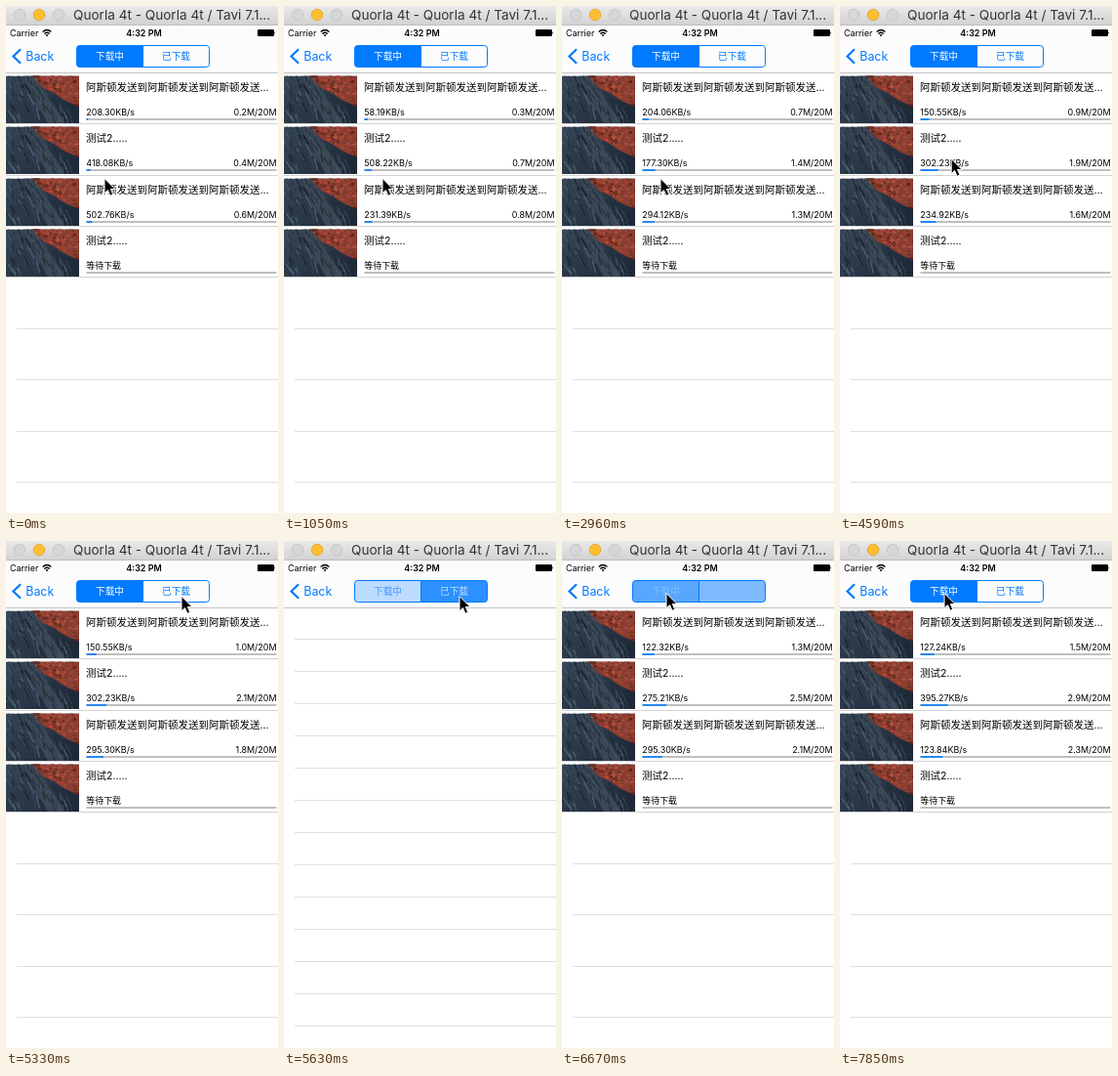
These frames come from a looping animation (279x519 px, 8 s). An HTML page:

```html
<!DOCTYPE html>
<html lang="zh-CN">
<head>
<meta charset="utf-8">
<style>
html, body { margin: 0; width: 100%; height: 100%; overflow: hidden; background: #fff; }
svg { display: block; width: 279px; height: 519px; }
text { font-family: Inter, "Noto Sans CJK SC", "Noto Sans CJK", sans-serif; white-space: pre; }
.small { font-size: 8.95px; }
.name { font-size: 10.5px; }
.tab { font-size: 9.7px; text-anchor: middle; }
</style>
</head>
<body>
<svg viewBox="0 0 279 519">
  <defs>
    <linearGradient id="chrome" x2="0" y2="1">
      <stop offset="0" stop-color="#e9e9e9"/><stop offset="1" stop-color="#d2d2d2"/>
    </linearGradient>
    <linearGradient id="slate" x2="1" y2=".6">
      <stop offset="0" stop-color="#35475a"/><stop offset="1" stop-color="#1f2a38"/>
    </linearGradient>
    <clipPath id="photoBox"><rect width="75" height="48.5"/></clipPath>
    <clipPath id="pill"><rect x="72.5" y="40.5" width="136" height="22" rx="3"/></clipPath>
    <g id="photo" clip-path="url(#photoBox)">
      <path d="M0 0H75V49H0Z" fill="url(#slate)"/>
      <path d="M27 0H75V31Q62 27 54 21T36 12Z" fill="#8c3d31"/>
      <g id="leaves"></g>
      <path d="M18 0H27L62 49H43Z" fill="#3b4855"/>
      <g id="bark" stroke-linecap="round"></g>
    </g>
  </defs>

  <rect width="279" height="519" fill="#fff"/>
  <g id="list"></g>
  <g id="blank"></g>

  <rect y="19" width="279" height="49" fill="#fcfcfc"/>
  <rect y="68" width="279" height="1" fill="#c4c4c6"/>
  <rect width="279" height="19.5" fill="url(#chrome)"/>
  <rect y="19" width="279" height=".8" fill="#b4b4b4"/>
  <g stroke-width=".8" stroke="#c2c2c2" fill="#d6d6d6">
    <circle cx="14" cy="9" r="5.8"/>
    <circle cx="34" cy="9" r="5.8" fill="#fdbe30" stroke="#e0a42a"/>
    <circle cx="54" cy="9" r="5.8"/>
  </g>
  <text x="69" y="14" font-size="13.6" fill="#333">Quorla 4t - Quorla 4t / Tavi 7.1...</text>

  <text class="small" x="4" y="31">Carrier</text>
  <g fill="none" stroke="#000" stroke-width="1.3">
    <path d="M37.6 26.6Q42 22.5 46.4 26.6M39.3 28.5Q42 26 44.7 28.5"/>
    <path d="M42 31.3l-1.4-1.6q1.4-1.2 2.8 0z" fill="#000" stroke="none"/>
  </g>
  <text class="small" x="141.5" y="31" text-anchor="middle" font-weight="600">4:32 PM</text>
  <rect x="258" y="24" width="17" height="7" rx="1.2"/>
  <path d="M275.4 26.2q1.6 1.3 0 2.6z"/>

  <path d="M15 44.3L7.5 51.5 15 58.7" fill="none" stroke="#007aff" stroke-width="2.2"/>
  <text x="20.3" y="56" font-size="12.4" fill="#007aff">Back</text>
  <g clip-path="url(#pill)" fill="#007aff">
    <rect id="leftFill" x="72" y="40" width="68.5" height="23"/>
    <rect id="rightFill" x="140.5" y="40" width="69" height="23"/>
  </g>
  <path d="M140.5 41V62" stroke="#007aff"/>
  <rect x="72.5" y="40.5" width="136" height="22" rx="3" fill="none" stroke="#007aff"/>
  <text id="leftTab" class="tab" x="106.5" y="55">下载中</text>
  <text id="rightTab" class="tab" x="174.5" y="55">已下载</text>

  <path id="cursor" d="M0 0V15.2L3.5 12 6 17.8 8.8 16.6 6.3 11H11Z" stroke="#fff" stroke-width="1" stroke-linejoin="round"/>
</svg>
<script>
const LOOP = 8000, TICKS = 54, ROW = 52.4;
const $ = id => document.getElementById(id);
const longName = "阿斯顿发送到阿斯顿发送到阿斯顿发送...", shortName = "测试2.....";

// start: megabytes at tick 0; rate: megabytes per tick; speeds: successive KB/s readings
const downloads = [
  { name: longName, start: .17, rate: .0243, speeds: [208.3, 58.19, 204.06, 150.55, 122.32, 127.24] },
  { name: shortName, start: .42, rate: .0466, speeds: [418.08, 508.22, 177.3, 302.23, 275.21, 395.27] },
  { name: longName, start: .6, rate: .033, speeds: [502.76, 231.39, 294.12, 234.92, 295.3, 123.84] },
  { name: shortName }
];

let seed = 7;
const random = (from, to) => {
  seed = seed * 16807 % 2147483647;
  return from + (to - from) * seed / 2147483647;
};
const repeat = (count, make) => Array.from({ length: count }, (_, i) => make(i)).join("");

// Autumn leaves fill the upper right corner, streaks of bark the rest.
$("leaves").innerHTML = repeat(130, () => {
  const x = random(29, 76), y = random(-1, (x - 22) * .58);
  return `<ellipse cx="${x}" cy="${y}" rx="${random(.8, 2.6)}" ry="${random(.6, 1.5)}"
    fill="hsl(${random(5, 15)} ${random(35, 62)}% ${random(22, 50)}%)"/>`;
});
$("bark").innerHTML = repeat(130, () => {
  const y = random(-4, 47), x = random(-2, 30 + y), len = random(3, 11);
  return `<path d="M${x} ${y}l${len * random(.1, .7)} ${len}" stroke-width="${random(.5, 1.5)}"
    stroke="hsl(211 ${random(14, 30)}% ${random(11, 38)}%)"/>`;
});

const rule = (x, y, color = "#dfdfe1") =>
  `<rect x="${x}" y="${y}" width="${279 - x}" height="1" fill="${color}"/>`;
const rowEnd = i => Math.round(120.2 + i * ROW);

$("list").innerHTML = downloads.map((d, i) => `
  <g transform="translate(0 ${Math.round(i * ROW)})">
    <use href="#photo" y="71.6"/>
    <text class="name" x="82" y="87">${d.name}</text>
    <text class="small" id="speed${i}" x="82.3" y="112">${d.rate ? "" : "等待下载"}</text>
    <text class="small" id="size${i}" x="277.5" y="112" text-anchor="end"></text>
    <rect x="82.5" y="115.2" width="195" height="1.6" fill="#b0b0b0"/>
    <rect id="bar${i}" x="82.5" y="115.2" height="1.6" width="0" fill="#007aff"/>
  </g>${rule(0, rowEnd(i), "#d2d2d5")}`).join("") + repeat(4, i => rule(11, rowEnd(i + 4)));
$("blank").innerHTML = repeat(13, i => rule(11, 100 + 33 * i));

const ramp = (t, start, length) => Math.min(1, Math.max(0, (t - start) / length));

// share: how far this tab is selected; a pressed tab starts from a 30% tint.
function paintTab(side, share, pressed) {
  $(side + "Fill").setAttribute("opacity", pressed ? .3 + .7 * share : share);
  $(side + "Tab").setAttribute("fill", `rgb(${255 * share},${122 + 133 * share},255)`);
}

function draw(tick) {
  const done = tick >= 38 && tick < 45;
  $("list").style.display = done ? "none" : "";
  $("blank").style.display = done ? "" : "none";

  const right = ramp(tick, 37, 4 / 3) - ramp(tick, 44, 2);
  paintTab("left", 1 - right, tick >= 44);
  paintTab("right", right, tick >= 37 && tick < 44);

  downloads.forEach((d, i) => {
    if (!d.rate) return;
    const mb = d.start + d.rate * tick;
    const reading = Math.round(tick / 10.6 + (i - 1) * .14);
    $("speed" + i).textContent = d.speeds[reading].toFixed(2) + "KB/s";
    $("size" + i).textContent = mb.toFixed(1) + "M/20M";
    $("bar" + i).setAttribute("width", 195 * mb / 20);
  });

  const go = ramp(tick, 30, 6), back = ramp(tick, 40, 3);
  $("cursor").setAttribute("transform",
    `translate(${101 + 79 * go - 73 * back} ${176.5 - 120 * go - 3 * back})`);
}

function run() {
  const t = performance.now() % LOOP;
  draw(Math.min(TICKS - 1, Math.floor((t + 5) * TICKS / LOOP)));
  requestAnimationFrame(run);
}
run();
</script>
</body>
</html>
```
